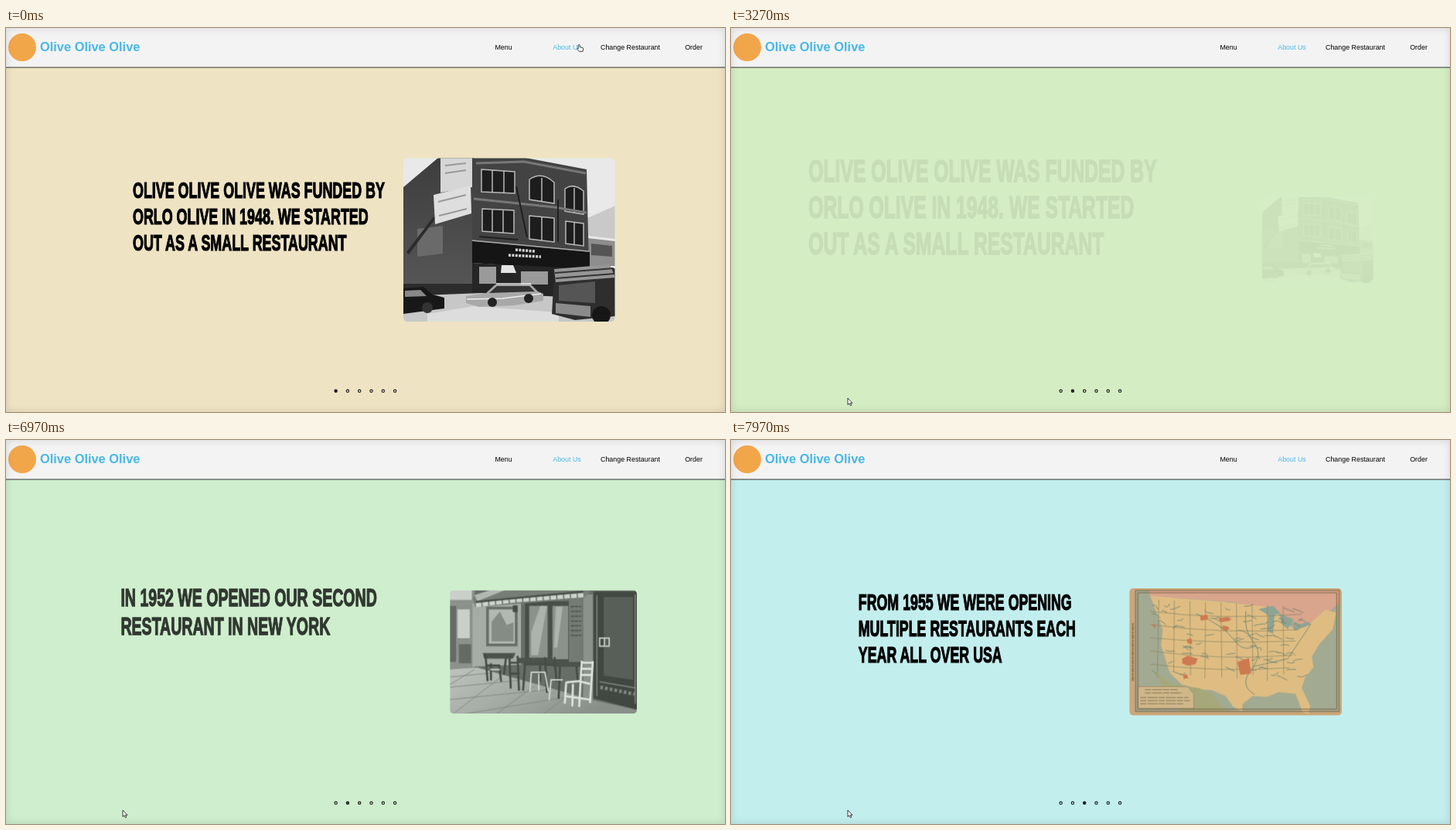
Recreate the animation shown at these times as an HTML page. Size 930x497 px, loop 8000 ms.

```html
<!DOCTYPE html>
<html lang="en">
<head>
<meta charset="utf-8">
<title>About us</title>
<style>
  html, body { margin: 0; width: 100%; height: 100%; overflow: hidden; }
  svg { display: block; width: 930px; height: 497px; font-family: "Liberation Sans", Arial, sans-serif; }
  .shade { position: absolute; left: 0; top: 0; width: 930px; height: 497px; box-shadow: inset 0 0 11px rgba(0, 0, 0, .13); pointer-events: none; }
  .brand { font-size: 16.4px; font-weight: 700; fill: #46b9e6; }
  .nav { font-size: 8.9px; text-anchor: middle; }
  .copy { font-size: 29px; font-weight: 700; stroke: #000; stroke-width: 1.2; }
</style>
</head>
<body>
<svg viewBox="0 0 930 497">
  <defs>
    <clipPath id="round0"><rect x="514" y="168.5" width="273.5" height="211.5" rx="5"/></clipPath>
    <clipPath id="round1"><rect x="514" y="184" width="273.5" height="180.5" rx="5"/></clipPath>
    <clipPath id="round2"><rect x="514" y="192.5" width="273.5" height="163.5" rx="5"/></clipPath>
    <clipPath id="crop0"><rect x="300" y="168" width="1200" height="214"/></clipPath>
    <clipPath id="crop1"><rect x="300" y="183.5" width="1200" height="183"/></clipPath>
    <clipPath id="crop2"><rect x="300" y="192" width="1200" height="166"/></clipPath>
    <linearGradient id="wall" x2="0" y2="1"><stop stop-color="#3d3d3d"/><stop offset="1" stop-color="#585858"/></linearGradient>
    <linearGradient id="floor" x2="1" y2=".4"><stop stop-color="#b9b9b9"/><stop offset="1" stop-color="#737373"/></linearGradient>
  </defs>

  <rect id="bg" width="930" height="497"/>

  <g id="slides">
    <g>
      <g class="words"></g>
      <g class="photo"><g clip-path="url(#crop0)"><g class="zoom"><g clip-path="url(#round0)">
        <path fill="#e9e9e9" d="M514 168h274v213H514z"/>
        <path fill="#8d8d8d" d="M752 272l36 4v32h-36z"/>
        <path fill="#c9c9c9" d="M752 246l36-16v43l-36-4z"/>
        <path fill="#555" d="M757 279l27 3v14l-27-2z"/>
        <path fill="url(#wall)" d="M514 206l45-38h46v182h-91z"/>
        <path fill="#6a6a6a" d="M532 260l33-4v36l-33 4z"/>
        <path fill="#2c2c2c" d="M514 331h90v17h-90zM518 290l35-46 3 2-35 47z"/>
        <path fill="#434343" d="M603 168h69l79 15 3 125-151-25z"/>
        <path fill="#d6d6d6" d="M562 168h41v38l-41 7z"/>
        <path fill="#dedede" d="M553 216l48-12 1 36-47 14z"/>
        <path fill="none" stroke="#999" stroke-width="2" d="M568 178l27-3M568 188l27-4M559 225l36-9M560 243l36-9"/>
        <g fill="#1d1d1d" stroke="#b8b8b8" stroke-width="1.5">
          <path d="M615 183l43 3v28l-43-2zM629 184v29M644 185v28"/>
          <path d="M677 196q16-11 32 4v27l-32-5zM693 194v31"/>
          <path d="M723 208q11-8 24 3v30l-24-4zM735 207v32"/>
          <path d="M616 234l41 2v30l-41-3zM629 235v29M643 236v29"/>
          <path d="M677 243l32 3v31l-32-4zM693 245v30"/>
          <path d="M724 250l23 3v29l-23-3zM735 252v28"/>
        </g>
        <path fill="none" stroke="#777" stroke-width="3" d="M608 175l62-2 80 15M605 221l105 11 41 7"/>
        <path fill="none" stroke="#202020" stroke-width="2" d="M612 270l50 4M660 205l14 66M714 222v55"/>
        <path fill="#151515" d="M603 276l152 14v24l-152-10z"/>
        <path fill="none" stroke="#d0d0d0" stroke-width="3.5" stroke-dasharray="3 1.4" d="M650 294l42 2M659 287l25 2"/>
        <path fill="none" stroke="#aaa" stroke-width="1.4" d="M603 275l151 14"/>
        <path fill="#252525" d="M603 304l152 8v38H603z"/>
        <path fill="#9a9a9a" d="M612 309h22v22h-22zM666 315h35v17h-35z"/>
        <path fill="#e4e4e4" d="M641 307h15l4 10h-20z"/>
        <path fill="#c7c7c7" d="M514 347l100-4 174 8v30H514z"/>
        <path fill="#ddd" d="M545 370l60-10 110 8v13H545z"/>
        <path fill="#181818" d="M514 337l26-2 12 10 15 4v14l-53 7z"/>
        <path fill="#888" d="M516 340l20-1 8 8-28 1z"/>
        <circle cx="545" cy="362" r="7" fill="#333"/>
        <path fill="#a8a8a8" d="M595 347l26-4 12-11h46l9 9 7 3v9l-38 6-45 2-17-5z"/>
        <path fill="#333" d="M625 343l10-9h42l7 7z"/>
        <path fill="none" stroke="#eee" stroke-width="1.3" d="M596 351l46-1 50-6M634 331h45"/>
        <circle cx="629" cy="355" r="6" fill="#222"/><circle cx="676" cy="350" r="6" fill="#222"/>
        <path fill="#2e2e2e" d="M711 318l77-7v62l-52 5-30-8 2-33z"/>
        <path fill="#969696" d="M709 312l72-6 7 17-77 6z"/>
        <path fill="none" stroke="#333" stroke-width="2" d="M710 317l76-6M711 324l76-6"/>
        <path fill="#555" d="M715 333l47-5v28l-47-3z"/>
        <path fill="#8b8b8b" d="M711 356l45 4v14l-45-5z"/>
        <circle cx="770" cy="372" r="12" fill="#161616"/>
      </g></g></g></g>
    </g>

    <g>
      <g class="words"></g>
      <g class="photo"><g clip-path="url(#crop1)"><g class="zoom"><g clip-path="url(#round1)">
        <path fill="#484848" d="M514 184h274v181H514z"/>
        <path fill="#777" d="M514 184h36v116h-36z"/>
        <path fill="#c8c8c8" d="M514 184h32v14h-32zM525 212h18v42h-18z"/>
        <path fill="#444" d="M514 207h9v82h-9zM527 263h18v28h-18z"/>
        <path fill="#999" d="M547 203h71v90l-71 3z"/>
        <path fill="#484848" d="M567 208h46v58h-46z"/>
        <path fill="#a9a9a9" d="M571 212h38v50h-38z"/>
        <path fill="#6f6f6f" d="M575 230l12-15 10 20 10-4v28h-32z"/>
        <path fill="#202020" d="M624 200h64v94h-64z"/>
        <path fill="#777" d="M630 207h27v76h-27zM664 207h23v78h-23z"/>
        <path fill="#a2a2a2" d="M633 245l13-38h10l-13 72h-10zM669 208h10l-8 60h-5z"/>
        <path fill="#595959" d="M688 196h20v98h-20z"/>
        <path stroke="#292929" stroke-width="2" stroke-dasharray="5 1" d="M691 208h15M691 215h15M691 222h15M691 229h15M691 236h15M691 243h15M691 250h15"/>
        <path fill="#777" d="M709 190h14v155h-14z"/>
        <path fill="#171717" d="M724 186h64v173l-64-17z"/>
        <path fill="#343434" d="M739 194h43v121l-43-6z"/>
        <path fill="none" stroke="#777" stroke-width="1.4" d="M729 191v148M785 190v160M733 318l52 9"/>
        <path fill="none" stroke="#c6c6c6" stroke-width="2" d="M733 254h14v12h-14zM740 254v12"/>
        <path fill="none" stroke="#696969" stroke-width="5" stroke-dasharray="4 3" d="M734 326l50 10"/>
        <path fill="#5b5b5b" d="M547 194l42-10h132l-12 12-158 13z"/>
        <path fill="#aaa" d="M550 191l22-7h22l-40 16z"/>
        <path fill="none" stroke="#cdcdcd" stroke-width="6" stroke-dasharray="8 2" d="M552 206l55-7 104-8"/>
        <path fill="none" stroke="#222" stroke-width="3" d="M552 201l157-15"/>
        <path fill="#1c1c1c" d="M606 206h7v10h-7z"/>
        <path fill="url(#floor)" d="M514 300l40-3 170 48 64 14v6H514z"/>
        <path fill="none" stroke="#686868" d="M514 311l61-6M514 326l100-10M514 344l149-15M536 365l150-25M550 300l-36 22M590 310l-70 54M638 324l-56 41M684 340l-33 25"/>
        <path fill="#252525" d="M562 276h48l-4 8h-42zM614 283h50v8h-50zM665 289h41v7h-41z"/>
        <g fill="none" stroke="#1d1d1d" stroke-width="3">
          <path d="M566 277l3 40M574 291v25M566 294h20l3 24M596 283l-3 25M601 280l2 48M613 280l2 51M601 290h13M601 306h15M624 290l-3 41M646 290v28M653 282l3 52M667 282l3 36M653 293h16M675 295l-2 48M699 295l2 23"/>
        </g>
        <path fill="none" stroke="#d2d2d2" stroke-width="2" d="M632 304h21l5 28M633 305l-2 28M644 306v25M661 315h18M662 316l-3 29M573 300h14"/>
        <path fill="none" stroke="#e2e2e2" stroke-width="3" d="M707 287l-4 68M723 288l-4 61M707 290h16M706 299h16M705 308h16M683 319l19-2 17 4M684 320l-2 30M694 321l-1 33M683 339l36 5"/>
      </g></g></g></g>
    </g>

    <g>
      <g class="words"></g>
      <g class="photo"><g clip-path="url(#crop2)"><g class="zoom"><g clip-path="url(#round2)">
        <path fill="#c9a777" d="M514 192h274v165H514z"/>
        <path fill="#a3aa92" d="M522 195h262v156H522z"/>
        <path fill="#d9a58c" d="M540 195h244v16l-22 20-24 10-40-22-53-9-105-8z"/>
        <path fill="#dfbd82" d="M541 202l96 8 53 6 18 12 14 14 23-3 21-19 14 3-4 22-18 20-9 15 2 14-11 14-4 13 11 23-2 10-8-2-9-24-22-2-15 6-18-1-13 10-1 11-12-8-9-13-17-7-19-2-21-6-15-15-11-35 2-20z"/>
        <path fill="#a6a878" d="M549 300l17 15 20 4 18 2 17 8 10 14 13 8h-62l-22-24z"/>
        <path fill="#8fa395" d="M680 219l19-4 9 9-7 3-2 24-7-3 1-21zM708 226l17 6-7 13-9-8zM724 242l21-7 2 4-20 8z"/>
        <path id="states" fill="none" stroke="#8b8660" stroke-width=".7"/>
        <path id="rivers" fill="none" stroke="#65806f" stroke-width=".8"/>
        <g fill="#ce7950">
          <path d="M582 283l7-4 13 4-3 7-10 2-7-3zM653 287l15-5 3 20-14 2zM605 228l9-2 2 6-10 2zM629 231l13-2 2 5-13 2zM634 240l8 2-2 6-6-2zM588 258l6-1 1 7-6-1zM543 240l4-2 1 6zM583 304l5-1 2 5-6 1z"/>
        </g>
        <path fill="#cfb78a" stroke="#8d7956" stroke-width=".6" d="M525 319h64l8 9v19h-72z"/>
        <path stroke="#877554" stroke-width="1" stroke-dasharray="8 1.4 13 1.2" d="M534 323h42M534 327h48M528 333h62M528 337h64M528 341h56"/>
        <path fill="none" stroke="#725e42" stroke-width=".9" d="M522 195h262v156H522zM525 198h256v150H525z"/>
        <path stroke="#806b4a" stroke-width="1.8" stroke-dasharray="3 .8 6 1" d="M518.5 237v75"/>
      </g></g></g></g>
    </g>
  </g>

  <rect width="930" height="51" fill="#f3f3f3"/>
  <path d="M0 51h930" stroke="#333" stroke-width="1.1"/>
  <circle cx="21" cy="25" r="18" fill="#f2a64a"/>
  <text class="brand" x="44" y="29.6">Olive Olive Olive</text>
  <g class="nav">
    <text x="643.5" y="27.6">Menu</text>
    <text x="725.5" y="27.6" fill="#46b9e6">About Us</text>
    <text x="807.5" y="27.6">Change Restaurant</text>
    <text x="889.5" y="27.6">Order</text>
  </g>
  <g id="dots" stroke="#1d1d1d" stroke-width="1.1"></g>
  <g fill="#fff" stroke="#111" stroke-width=".8" stroke-linejoin="round">
    <path id="hand" d="M740.2 26.8V22q1-1.3 2 0v2.7l3.8.9q.9.3.7 1.5l-.7 3.3h-4.4l-2.9-3.2q.2-1.3 1.5-.4z"/>
    <path id="arrow" d="M0 0V8.6L2 6.8 3.4 9.8 4.8 9.2 3.5 6.4H6z"/>
  </g>
</svg>
<div class="shade"></div>

<script>
const LOOP = 8000;
const NS = "http://www.w3.org/2000/svg";
const $ = id => document.getElementById(id);
const add = (parent, tag, attrs) => {
  const el = parent.appendChild(document.createElementNS(NS, tag));
  for (const key in attrs) el.setAttribute(key, attrs[key]);
  return el;
};

const slides = [
  { enter: -1e5, exit: 2939, cy: 274.2, color: [238, 227, 195],
    lines: ["OLIVE OLIVE OLIVE WAS FUNDED BY", "ORLO OLIVE IN 1948. WE STARTED", "OUT AS A SMALL RESTAURANT"] },
  { enter: 3474, exit: 6939, cy: 274.2, color: [211, 238, 195],
    lines: ["IN 1952 WE OPENED OUR SECOND", "RESTAURANT IN NEW YORK"] },
  { enter: 7499, exit: 1e5, cy: 274.2, color: [195, 238, 238],
    lines: ["FROM 1955 WE WERE OPENING", "MULTIPLE RESTAURANTS EACH", "YEAR ALL OVER USA"] }
];

slides.forEach((s, i) => {
  s.el = $("slides").children[i];
  for (const part of ["words", "photo", "zoom"]) s[part] = s.el.querySelector("." + part);
  s.lines.forEach((line, n) => {
    // one condensed cut for all headings
    add(s.words, "text", { class: "copy", transform: `translate(164 ${220 + n * 34}) scale(.617 1)` }).textContent = line;
  });
});

const dots = Array.from({ length: 6 }, (_, i) =>
  add($("dots"), "circle", { cx: 426.6 + i * 15.3, cy: 469.8, r: 1.7, fill: "#1d1d1d" }));

// map line work
let seed = 7;
const rnd = () => (seed = seed * 16807 % 2147483647) / 2147483647;
let borders = "", streams = "";
for (let i = 0; i < 9; i++) {
  const x = 552 + i * 20;
  borders += `M${x} ${207 + i}l${rnd() * 4 - 2} ${88 + rnd() * 14}`;
}
for (let i = 0; i < 5; i++) borders += `M541 ${222 + i * 17}q90 ${8 + rnd() * 5} ${195 - i * 4} ${rnd() * 8}`;
for (let i = 0; i < 75; i++) {
  const x = 543 + rnd() * 190, y = 214 + rnd() * 92;
  streams += `M${x} ${y}q${rnd() * 8} ${rnd() * 8 - 4} ${5 + rnd() * 9} ${rnd() * 10 - 4}`;
}
$("states").setAttribute("d", borders);
$("rivers").setAttribute("d", streams + "M664 222q-3 25 10 40t-3 35 4 32M600 225q35 15 48 33t28 8M748 238l-30 45-44 10");

const path = [
  [100, 741, 21], [330, 553, 242], [540, 553, 242], [1100, 350, 452],
  [1270, 341, 446], [1500, 341, 446], [1670, 151, 479]
];
function cursorAt(t) {
  const n = path.findIndex(p => p[0] > t);
  if (n < 0) return path[path.length - 1].slice(1);
  if (!n) return path[0].slice(1);
  const [a, b] = [path[n - 1], path[n]];
  const u = (t - a[0]) / (b[0] - a[0]), e = u * u * (3 - 2 * u);
  return [a[1] + (b[1] - a[1]) * e, a[2] + (b[2] - a[2]) * e];
}

const settle = (t, tau) => t <= 0 ? 0 : 1 - Math.exp(-t / tau);
const scaleAt = (x, y, s) => `translate(${x} ${y}) scale(${s}) translate(${-x} ${-y})`;

function draw(t) {
  let color = slides[0].color;
  slides.forEach((s, i) => {
    const next = slides[i + 1];
    const shown = t >= s.enter && !(next && t >= next.enter);
    s.el.setAttribute("display", shown ? "inline" : "none");
    const gone = settle(t - s.exit, 124);
    if (next) color = color.map((c, n) => c + (next.color[n] - c) * gone);
    if (!shown) return;
    const come = settle(t - s.enter, 88);
    const slide = 400 * (1 - come) + 108.6 * settle(t - s.exit, 61);
    s.el.setAttribute("opacity", come * (1 - gone));
    s.words.setAttribute("transform", scaleAt(331, 276, come + .41 * gone));
    s.photo.setAttribute("transform", `translate(${slide} 0)`);
    s.zoom.setAttribute("transform", scaleAt(650.75, s.cy, 2 - come - .51 * gone));
  });
  $("bg").setAttribute("fill", `rgb(${color.map(Math.round)})`);

  const pos = slides.reduce((sum, s) => sum + settle(t - s.exit, 124), 0);
  dots.forEach((dot, i) => dot.setAttribute("fill-opacity", Math.max(0, 1 - Math.abs(i - pos))));

  const overLink = t < 130;
  $("hand").setAttribute("display", overLink ? "inline" : "none");
  $("arrow").setAttribute("display", overLink ? "none" : "inline");
  $("arrow").setAttribute("transform", `translate(${cursorAt(t)})`);
}

function tick() {
  draw(performance.now() % LOOP);
  requestAnimationFrame(tick);
}
tick();
</script>
</body>
</html>
```
